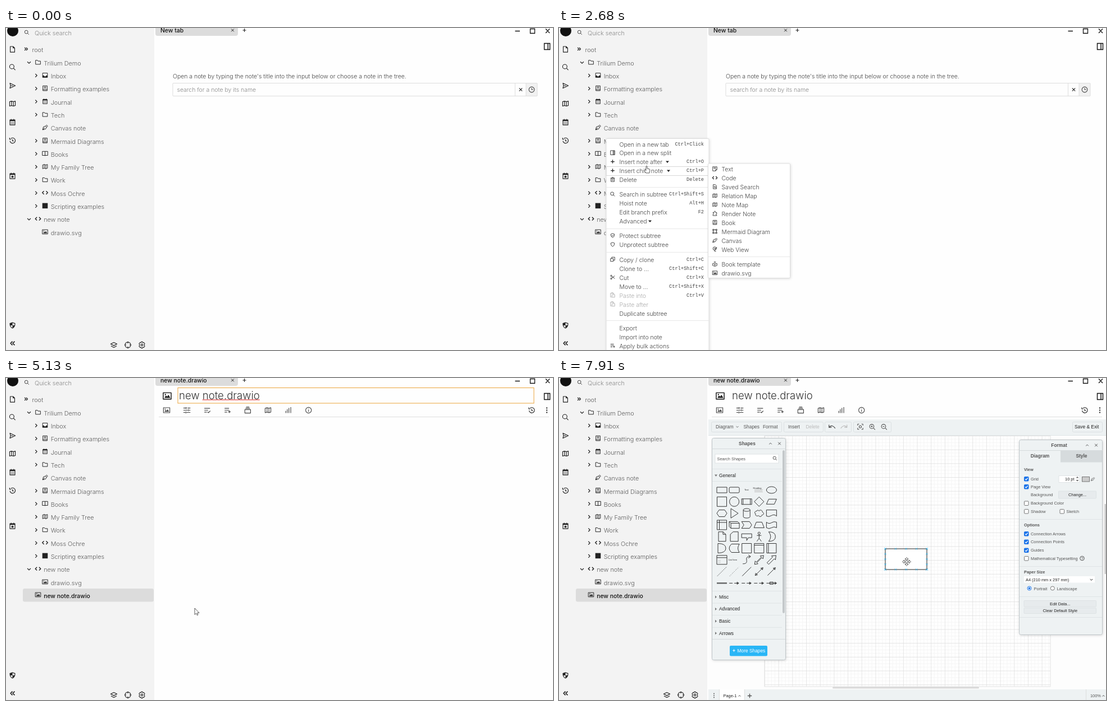
An HTML page for the animation above (8000 ms loop, 974 by 575 pixels).

```html
<!DOCTYPE html>
<html lang="en">
<head>
<meta charset="utf-8">
<title>Creating a diagram note</title>
<style>
html, body { margin: 0; width: 100%; height: 100%; overflow: hidden; background: #fff; }
svg { display: block; width: 974px; height: 575px; }
text { font: 300 10.45px Inter, "Open Sans", sans-serif; fill: #444; white-space: pre; }
.tree { font-size: 10.8px; fill: #5c5c5c; }
.soft { fill: #888; }
.off { fill: #aaa; }
.semi { font-size: 10.4px; font-weight: 500; fill: #111; }
.title { font-size: 18.6px; fill: #333; }
.key { font: 8.6px "Liberation Mono", monospace; fill: #444; }
.ui { font: 8.4px "Liberation Sans", Arial, sans-serif; fill: #555; }
.s { font-size: 7.4px; }
.xs { font-size: 4px; }
.b { font-weight: 700; }
.dark { fill: #222; }
.pale { fill: #bbb; }
.white { fill: #fff; }
.mid { text-anchor: middle; }
.end { text-anchor: end; }
.line { fill: none; stroke: currentColor; stroke-width: 2; stroke-linejoin: round; }
.heavy { stroke-width: 3; }
.solid { fill: currentColor; }
.tile { fill: none; stroke: #222; stroke-width: .9; }
.glyph { fill: #fff; stroke: #333; stroke-width: .8; stroke-linejoin: round; }
.pop { filter: drop-shadow(1px 1px 2px #0002); }
</style>
</head>
<body>
<svg id="stage" viewBox="0 0 974 575"></svg>
<script>
const stage = document.getElementById('stage');

// Icons on a 24 unit grid: outline, then filled part.
const icons = {
  file: ['M5 3h9l5 5v13H5zM14 3v5h5'],
  search: ['M3 10a7 7 0 1 0 14 0a7 7 0 1 0-14 0M15 15l6 6'],
  send: ['M4 4l17 8l-17 8l2-8zM6 12h8'],
  map: ['M3 6l6-2l6 2l6-2v14l-6 2l-6-2l-6 2zM9 4v14M15 6v14'],
  cal: ['M4 5h16v16H4zM8 2v4M16 2v4M7 13h2M11 13h2M15 13h2M7 17h2M11 17h2M15 17h2', 'M4 5h16v4H4z'],
  star: ['M4 5h16v16H4zM8 2v4M16 2v4', 'M4 5h16v4H4zM12 10l1.5 3l3.5.5l-2.5 2l.5 3.5l-3-2l-3 2l.5-3.5l-2.5-2l3.5-.5z'],
  history: ['M4 13a8.5 8.5 0 1 0 3-7.5M3 3v5h5M12 8v5h4'],
  clock: ['M3 12a9 9 0 1 0 18 0a9 9 0 1 0-18 0M12 7v5h5'],
  info: ['M3 12a9 9 0 1 0 18 0a9 9 0 1 0-18 0M12 11v6M12 7v2'],
  shield: ['M12 3l8 3q0 11-8 15q-8-4-8-15z'],
  guard: ['M12 3l8 3q0 11-8 15q-8-4-8-15z', 'M12 3v9h8q-2 6-8 9v-9H4V6z'],
  checked: ['M12 3l8 3q0 11-8 15q-8-4-8-15zM8 12l3 3l5-6'],
  left2: ['M12 6l-6 6l6 6M19 6l-6 6l6 6'],
  right2: ['M5 6l6 6l-6 6M12 6l6 6l-6 6'],
  right: ['M9 5l7 7l-7 7'],
  down: ['M5 9l7 7l7-7'],
  up: ['M5 16l7-7l7 7'],
  folder: ['M3 5h7l2 3h9v12H3z'],
  inbox: ['M3 4h18v16H3z', 'M3 13h5l1 3h6l1-3h5v7H3z'],
  book: ['M4 3h16v18H4zM4 17h16M8 7h8M8 11h8'],
  open: ['M2 4h20v15H2zM12 4v17'],
  pen: ['M3 21l3-11l8-3l4 4l-4 7zM14 7l4-4l4 4l-4 4M3 21l8-8'],
  code: ['M8 6l-6 6l6 6M16 6l6 6l-6 6'],
  image: ['M2 4h20v16H2z', 'M5 17l4-6l3 3l3-5l5 8zM6 7h3v3H6z'],
  square: ['', 'M2 2h20v20H2z'],
  layers: ['M2 9l10-5l10 5l-10 5zM3 15l9 5l9-5'],
  target: ['M3 12a9 9 0 1 0 18 0a9 9 0 1 0-18 0M12 1v6M12 17v6M1 12h6M17 12h6'],
  gear: ['M10 2h4l1 3l3-1l3 4l-2 4l2 4l-3 4l-3-1l-1 3h-4l-1-3l-3 1l-3-4l2-4l-2-4l3-4l3 1zM9 12a3 3 0 1 0 6 0a3 3 0 1 0-6 0'],
  plus: ['M12 4v16M4 12h16'],
  x: ['M5 5l14 14M19 5l-14 14'],
  split: ['M3 3h18v18H3zM14 3v18M18 3v18'],
  trash: ['M5 7h14v14H5zM3 6h18M9 3h6M10 11v6M14 11v6'],
  copy: ['M3 9h12v12H3zM8 9V3h13v13h-6'],
  cut: ['M3 6a3 3 0 1 0 6 0a3 3 0 1 0-6 0M3 18a3 3 0 1 0 6 0a3 3 0 1 0-6 0M8 8l13 10M8 16L21 6'],
  paste: ['M8 20H3V4h14v5M7 4V2h6v4M9 10h12v11H9z'],
  bulk: ['M3 6h14M3 12h14M3 18h8M18 13v8M14 17h8'],
  note: ['M3 3h18v12l-6 6H3zM21 15h-6v6', 'M7 7h10v3H7z'],
  find: ['M5 3h9l5 5v13H5zM9 13a3 3 0 1 0 6 0a3 3 0 1 0-6 0M14 15l3 3'],
  puzzle: ['M4 8h5V5a3 3 0 0 1 6 0v3h5v5a3 3 0 0 0 0 6v2H4v-5a3 3 0 0 0 0-6z'],
  nodes: ['M3 3h5v5H3zM16 3h5v5h-5zM3 16h5v5H3zM16 16h5v5h-5zM8 5h8M5 8v8M19 8v8M8 19h8'],
  web: ['M4 9a7 7 0 1 0 14 0a7 7 0 1 0-14 0M8 9h7M11 12q9 0 9-9M11 16v5h6'],
  reader: ['M3 10l9 3l9-3v9l-9 3l-9-3zM12 13v8M9 5a3 3 0 1 0 6 0a3 3 0 1 0-6 0'],
  sliders: ['M1 5h9M14 5h9M10 2v6M1 12h14M19 12h4M17 9v6M1 19h6M11 19h12M9 16v6'],
  tasks: ['M3 6h18M3 12h12M3 18h8M13 17l3 3l6-6'],
  stack: ['M3 10h18v11H3zM5 6h14M7 2h10'],
  bars: ['M4 14v7M9 9v12M14 5v16M20 2v19'],
  dots: ['', 'M10 2h4v4h-4zM10 10h4v4h-4zM10 18h4v4h-4z'],
  fit: ['M3 8V3h5M16 3h5v5M21 16v5h-5M8 21H3v-5M8 12a4 4 0 1 0 8 0a4 4 0 1 0-8 0'],
  zin: ['M3 10a7 7 0 1 0 14 0a7 7 0 1 0-14 0M15 15l6 6M7 10h6M10 7v6'],
  zout: ['M3 10a7 7 0 1 0 14 0a7 7 0 1 0-14 0M15 15l6 6M7 10h6'],
  undo: ['M3 6v8h8M4 13q9-9 18 4'],
  redo: ['M21 6v8h-8M20 13q-9-9-18 4'],
};
const heavy = ['right', 'down', 'up', 'left2', 'right2', 'x', 'plus', 'code'];

const text = (x, y, s, cls = '') => `<text x="${x}" y="${y + 3.7}" class="${cls}">${s}</text>`;
const ui = (x, y, s, cls = '') => `<text x="${x}" y="${y + 2.8}" class="ui ${cls}">${s}</text>`;
const rect = (x, y, w, h, fill, stroke = 'none', r = 0, attr = '') =>
  `<rect x="${x}" y="${y}" width="${w}" height="${h}" rx="${r}" fill="${fill}" stroke="${stroke}" ${attr}/>`;
const path = (d, color = '#ddd', w = 1, attr = '') => `<path d="${d}" fill="none" stroke="${color}" stroke-width="${w}" ${attr}/>`;
const fill = (d, color = '#222') => `<path d="${d}" fill="${color}"/>`;
const ring = (x, y, r, color, inside = 'none') => `<circle cx="${x}" cy="${y}" r="${r}" fill="${inside}" stroke="${color}"/>`;
const group = (id, body) => `<g id="${id}">${body}</g>`;
const icon = (name, x, y, size = 11, color = '#222') => {
  const [line, solid] = icons[name];
  const cls = heavy.includes(name) ? 'line heavy' : 'line';
  return `<g transform="translate(${x - size / 2} ${y - size / 2}) scale(${size / 24})" color="${color}">` +
    (line ? `<path class="${cls}" d="${line}"/>` : '') + (solid ? `<path class="solid" d="${solid}"/>` : '') + '</g>';
};

function sidebar() {
  const bar = [['file', 38], ['search', 70], ['send', 103], ['map', 135], ['cal', 168], ['history', 201],
    ['star', 264], ['guard', 531], ['left2', 563]];
  const tree = ['0folder|Trilium Demo', '1inbox|Inbox', '1book|Formatting examples', '1cal|Journal', '1folder|Tech',
    '2pen|Canvas note', '1book|Mermaid Diagrams', '1open|Books', '1map|My Family Tree', '1folder|Work',
    '1code|Moss Ochre', '1square|Scripting examples', '0code|new note', '2image|drawio.svg'];
  return rect(0, 0, 264, 575, '#f3f3f3') + '<circle cx="12" cy="5" r="10" fill="#111"/>' +
    bar.map(([n, y]) => icon(n, 11.5, y, 13.5)).join('') +
    icon('search', 37, 8, 10) + text(51, 9, 'Quick search', 'tree soft') +
    icon('right2', 36, 37.5, 10) + text(46.5, 39.5, 'root', 'tree') +
    tree.map((row, i) => {
      const [name, label] = row.slice(1).split('|'), level = +row[0], y = 63 + 23.31 * i;
      const x = level ? 69.5 : 57;
      return (level < 2 ? icon(level ? 'right' : 'down', x - 16, y - 1.5, 10) : '') +
        icon(name, x, y - 2, 11.5) + text(x + 10.2, y, label, 'tree');
    }).join('') +
    group('newRow', rect(30, 376, 233, 23.5, '#dcdcdc', 'none', 3) + icon('image', 57, 387, 11.5) + text(67.2, 388.8, '', 'semi name')) +
    icon('layers', 192, 566, 13.5) + icon('target', 217, 566, 13.5) + icon('gear', 242, 566, 13.5);
}

function frame() {
  return fill('M266 0H413V10Q413 14 409 14H270Q266 14 266 10Z', '#dcdcdc') +
    text(275, 4, '', 'semi name') + icon('x', 403.5, 4, 8) + icon('plus', 424.5, 4, 9) +
    path('M906.5 5.5H915M933.5 1.5H941.5V9.5H933.5ZM961 1.5L968 9M968 1.5L961 9', '#111', 1.3) +
    path('M958.5 27.5H968.5V38.5H958.5ZM965 27.5V38.5', '#111', 1.4);
}

function emptyTab() {
  return text(297, 86, "Open a note by typing the note's title into the input below or choose a note in the tree.") +
    rect(926, 98.5, 20, 23, '#f1f1f1') + rect(297, 98.5, 649, 23, 'none', '#ddd', 1) +
    path('M906.5 98.5V121.5M926 98.5V121.5') + text(304.5, 110, 'search for a note by its name', 'soft') +
    icon('x', 916.5, 110, 9) + icon('clock', 936, 110, 13, '#444');
}

function noteHead() {
  const ribbon = ['image', 'sliders', 'tasks', 'bulk', 'stack', 'map', 'bars', 'info'];
  return icon('image', 287, 32, 17, '#111') +
    '<text id="title" x="308" y="37.5" class="title name"></text>' +
    group('focus', rect(306, 17.5, 634, 27.5, 'none', '#eba43a') +
      path('M0 0', '#e02020', 1.2, 'id="spell"') + rect(0, 21, 1, 20, '#222', 'none', 0, 'id="caret"')) +
    ribbon.map((n, i) => icon(n, 286 + 36.1 * i, 57.5, 13.5, '#444')).join('') +
    icon('history', 936, 57.5, 13.5) + icon('dots', 963, 57.5, 12) + path('M272 69.5H967');
}

// Row centre, label, icon, shortcut, x of the submenu mark.
const menuRows = [
  [208, 'Open in a new tab', '', 'Ctrl+Click'], [223.7, 'Open in a new split', 'split'],
  [239.5, 'Insert note after', 'plus', 'Ctrl+O', 193], [255.5, 'Insert child note', 'plus', 'Ctrl+P', 195],
  [271.5, 'Delete', 'trash', 'Delete'], [297.7, 'Search in subtree', 'search', 'Ctrl+Shift+S'],
  [313.7, 'Hoist note', '', 'Alt+H'], [329.6, 'Edit branch prefix', '', 'F2'], [345.5, 'Advanced', '', '', 162],
  [371.7, 'Protect subtree', 'checked'], [387.7, 'Unprotect subtree', 'shield'], [414, 'Copy / clone', 'copy', 'Ctrl+C'],
  [430, 'Clone to ...', '', 'Ctrl+Shift+C'], [446, 'Cut', 'cut', 'Ctrl+X'], [462, 'Move to ...', '', 'Ctrl+Shift+X'],
  [478, 'Paste into', 'paste', 'Ctrl+V'], [494, 'Paste after', 'paste'], [510, 'Duplicate subtree'],
  [536.5, 'Export'], [552.3, 'Import into note'], [568, 'Apply bulk actions', 'bulk'],
];
const kinds = [['Text', 'note'], ['Code', 'code'], ['Saved Search', 'find'], ['Relation Map', 'map'], ['Note Map', 'map'],
  ['Render Note', 'puzzle'], ['Book', 'book'], ['Mermaid Diagram', 'nodes'], ['Canvas', 'pen'], ['Web View', 'web'],
  ['Book template', 'reader'], ['drawio.svg', 'image']];
const kindY = i => 10.5 + 15.95 * i + (i > 9 ? 10.3 : 0);

function contextMenu() {
  return rect(84, 197.5, 183, 400, '#fff', '#ddd', 2, 'class="pop"') +
    path('M84 284.5H267M84 358.5H267M84 400.5H267M84 522.5H267', '#e8e8e8') +
    rect(84, 0, 183, 16, 'none', '#d8d8d8', 0, 'id="menuHover"') +
    menuRows.map(([y, label, name, key, mark]) => {
      const off = label.startsWith('Paste');
      return (name ? icon(name, 95.5, y - 1, 10, off ? '#aaa' : '#222') : '') + text(107.5, y, label, off ? 'off' : '') +
        (key ? text(258, y - 2, key, 'key end' + (off ? ' off' : '')) : '') +
        (mark ? fill(`M${mark - 3} ${y - 2}h6l-3 3.5z`) : '');
    }).join('');
}

function subMenu() {
  return rect(265.5, 0, 146, 204.5, '#fff', '#ddd', 2, 'class="pop"') + path('M266 166.5H411', '#e8e8e8') +
    rect(265.5, 0, 146, 16, 'none', '#d0d0d0', 0, 'id="kindHover"') +
    kinds.map(([label, name], i) => icon(name, 277.5, kindY(i) - 1, 10) + text(289.5, kindY(i), label)).join('');
}

const tileRow = (row, ...shapes) => shapes.map((d, i) =>
  d && `<path class="tile" d="${d}" transform="translate(${290 + 22.1 * i} ${200 + 20.8 * row})"/>`).join('');
const box = 'M-8.5-8.5H8.5V8.5H-8.5Z', slab = 'M-9-5H9V5H-9Z', link = 'M-9 0H-3M0 0H8l-3-2v4l3-2';

function shapeTiles() {
  const tiny = [[334, 200, 'Text'], [353, 196.5, 'Heading'], [309.5, 324.5, 'List Item']];
  return tileRow(0, slab, 'M-7-5H7Q9-5 9-3V3Q9 5 7 5H-7Q-9 5-9 3V-3Q-9-5-7-5Z', '', '', 'M-9 0A9 6 0 1 1 9 0A9 6 0 1 1-9 0Z') +
    tileRow(1, box, 'M-8.5 0a8.5 8.5 0 1 1 17 0a8.5 8.5 0 1 1-17 0Z', slab + 'M-6.5-5V5M6.5-5V5',
      'M0-8.5L8.5 0L0 8.5L-8.5 0Z', 'M-5-4.5H9L5 4.5H-9Z') +
    tileRow(2, 'M-5-6H5L9 0L5 6H-5L-9 0Z', 'M-6-8.5L7 0L-6 8.5Z',
      'M-6-6V6A6 2.5 0 0 0 6 6V-6A6 2.5 0 0 0-6-6A6 2.5 0 0 0 6-6',
      'M-4-4C-8-4-9 0-6 1C-8 4-3 6-1 4C1 7 5 6 5 3C9 3 9-1 6-2C6-6 1-7 0-4C-1-6-4-6-4-4Z', 'M-9-6H9V5Q4.5 1 0 4T-9 5Z') +
    tileRow(3, box + 'M-8.5-4.5H8.5M-4.5-8.5V8.5', 'M-9-6H6L9-3V6H-6L-9 3ZM-9-6L-6-3H9M-6-3V6',
      'M-9-6H5L9 0L5 6H-9L-5 0Z', 'M-5-5H5L9 5H-9Z', 'M-9-5Q-4.5-1 0-4T9-5V5Q4.5 2 0 5T-9 5Z') +
    tileRow(4, 'M-6-8.5H2L7-4V8.5H-6ZM2-8.5V-4H7', 'M-2-8.5H7V8.5H-7V-4Z', 'M-9-5H9V2H3L0 7V2H-9Z',
      'M-2-6a2 2 0 1 1 4 0a2 2 0 1 1-4 0M0-4V3M-4-2H4M-4 8.5L0 3L4 8.5', 'M-5-8.5Q7-8.5 7 0T-5 8.5Q2 0-5-8.5Z') +
    tileRow(5, 'M-7-8.5Q7-8.5 7 0T-7 8.5Z', 'M-5-7.5H9Q4 0 9 7.5H-5Q-13 0-5-7.5Z', box,
      box + 'M-8.5-5.5H8.5', box + 'M-5.5-8.5V8.5') +
    tileRow(6, 'M-9-8H9V8H-9ZM-9-4H9', '', 'M-7 7C8 7-8-6 6-6M3-9L7-6L3-3',
      'M-8 8L-7 2L-5 4L4-5L2-7L8-8L7-2L5-4L-4 5L-2 7Z', 'M-8 5L2-5L0-7L8-8L7 0L5-2L-5 8Z') +
    `<g stroke-dasharray="1.5 1.5">${tileRow(7, 'M-8 8L8-8')}</g><g stroke-dasharray=".8 2">${tileRow(7, '', 'M-8 8L8-8')}</g>` +
    tileRow(7, '', '', 'M-8 8L8-8', 'M-6 6L6-6M7-7l-4 1l3 3ZM-7 7l4-1l-3-3Z', 'M-7 7L6-6M7-7l-4 1l3 3Z') +
    tileRow(8, 'M-9-.5H9M-9 .5H9', link, link, link, 'M-9 0H9l-3-2v4l3-2M-3-2H3V2H-3Z') +
    tiny.map(([x, y, s]) => ui(x, y - 1.8, s, 'xs mid dark')).join('') +
    path('M348 199.5H363M348 201.5H362M348 203.5H363M283 326H288M283 329H288', '#bbb', .8);
}

const panel = (x, y, w, h, name) => rect(x, y, w, h, '#eef2f3', '#bfc5c8', 3, 'class="pop"') +
  path(`M${x} ${y + 19}h${w}`, '#d5dadc') + ui(x + w / 2 - 3, y + 9.5, name, 'b mid') +
  icon('up', x + w - 27, y + 9.5, 8, '#555') + icon('x', x + w - 11, y + 9.5, 8, '#555');

function shapesPanel() {
  return panel(272.5, 107.5, 131, 396, 'Shapes') + rect(278, 136, 113, 16, '#fff', '#e0e4e6') +
    ui(281.5, 144, 'Search Shapes', 's') + icon('search', 384.5, 143.5, 9) + rect(398, 129, 4, 291, '#c4c8ca', 'none', 2) +
    path('M273 162.5H397M273 184.5H397', '#dfe4e6') + fill('M277 172.5h5l-2.5 3.5z', '#777') +
    ui(285, 174, 'General', 'dark') + shapeTiles() +
    ['Misc', 'Advanced', 'Basic', 'Arrows'].map((s, i) => {
      const y = 391 + 21.6 * i;
      return path(`M273 ${y - 10.5}H397`, '#dfe4e6') + fill(`M278 ${y - 2.5}v5l3-2.5z`, '#777') + ui(285, y, s, 'dark');
    }).join('') + path('M273 466.5H403', '#d5dadc') +
    rect(304, 478, 67, 18.5, '#29b6f6', 'none', 2) + ui(309, 487.3, '+', 'white b') + ui(317.5, 487.3, 'More Shapes', 'white');
}

const check = (x, y, on) => rect(x - 3.5, y - 3.5, 7.5, 7.5, on ? '#1a73e8' : '#fff', on ? '#1a73e8' : '#777', 1) +
  (on ? path(`M${x - 2} ${y + .3}l1.7 1.7l3-3.7`, '#fff', 1.2) : '');
const button = (x, y, w, h, s) => rect(x, y, w, h, '#e7ebed', '#dde2e4', 1) + ui(x + w / 2, y + h / 2, s, 's mid dark');

function formatPanel() {
  const checks = [['Grid', 180, 1], ['Page View', 194, 1], ['Background Color', 223.5, 0], ['Shadow', 238, 0],
    ['Connection Arrows', 278, 1], ['Connection Points', 292.5, 1], ['Guides', 307.5, 1], ['Mathematical Typesetting', 322, 0]];
  return panel(819.5, 110.5, 148, 348, 'Format') + rect(893, 130, 74, 20.5, '#d6dbdd') +
    ui(856.5, 139.5, 'Diagram', 'b mid') + ui(930.5, 139.5, 'Style', 'b mid') +
    [['View', 163.5], ['Options', 262.5], ['Paper Size', 346.5]].map(([s, y]) => ui(828, y, s, 's b')).join('') +
    checks.map(([s, y, on]) => check(832, y, on) + ui(840, y, s, 's')).join('') +
    check(895.5, 238, 0) + ui(903.5, 238, 'Sketch', 's') +
    path('M820 252.5H967M820 336.5H967M820 390.5H967M820 427.5H967', '#dfe4e6') +
    rect(890, 174.5, 37, 12, '#fff', '#e0e4e6') + ui(917.5, 180.5, '10 pt', 's end dark') +
    fill('M920.5 178.5h5l-2.5-2.5zM920.5 182h5l-2.5 2.5z', '#666') +
    rect(931.5, 176.5, 13, 8.5, '#ccc', '#777') + icon('pen', 950.5, 180.5, 8, '#555') +
    ui(840, 208.5, 'Background', 's') + button(889.5, 202, 67, 13, 'Change...') +
    ring(931.5, 322, 3.8, '#555') + ui(931.5, 322, '?', 's mid') +
    rect(828, 354, 126, 11.5, '#fff') + ui(831, 359.8, 'A4 (210 mm x 297 mm)', 's dark') + icon('down', 948, 360, 8) +
    ring(837.5, 375.5, 3.5, '#1a73e8', '#fff') + ring(837.5, 375.5, 1.5, '#1a73e8', '#1a73e8') +
    ring(878.8, 375.5, 3.5, '#777', '#fff') +
    ui(845.5, 376.5, 'Portrait', 's') + ui(886.5, 376.5, 'Landscape', 's') +
    button(828, 397.5, 128.5, 11, 'Edit Data...') + button(828, 410.5, 128.5, 10, 'Clear Default Style');
}

function editor() {
  const unit = 6.17, cell = unit * 4;
  const crosses = [0, 1, 2, 3, 4].flatMap(i => {
    const x = 581 + 18.5 * i, y = 305 + 9.25 * i;
    return [[x, 305], [x, 342], [581, y], [655, y]];
  }).map(([x, y]) => `M${x - 1.5} ${y - 1.5}l3 3m0-3l-3 3`).join('');
  const slots = [[271, 125], [400, 70], [473, 47], [524, 67], [914, 53]];
  return `<defs><pattern id="grid" x="366" y="103" width="${cell}" height="${cell}" patternUnits="userSpaceOnUse">` +
    [1, 2, 3].map(i => path(`M${unit * i} 0V${cell}M0 ${unit * i}H${cell}`, '#f4f4f4', .9)).join('') +
    path(`M0 0V${cell}M0 0H${cell}`, '#dcdcdc', 1.4) + '</pattern></defs>' +
    rect(266, 74, 708, 501, '#fdfdfd') + rect(366, 103, 509, 448, '#fff') + rect(366, 103, 509, 448, 'url(#grid)', '#e2e2e2') +
    group('shape', rect(581, 305, 74, 37, '#fff', '#222') + group('crosses', path(crosses, '#29a9e0', .9))) +
    rect(266, 74, 708, 28, '#eef2f3') + path('M266 102.5H974', '#dfe4e6') +
    slots.map(([x, w]) => rect(x + .5, 78.5, w, 18, '#eef2f3', '#dbe0e2', 2)).join('') +
    ui(279, 87.5, 'Diagram') + icon('down', 317.5, 87, 7, '#555') + ui(328.5, 87.5, 'Shapes') + ui(363, 87.5, 'Format') +
    ui(408, 87.5, 'Insert') + ui(439.5, 87.5, 'Delete', 'pale') +
    group('undoOff', icon('undo', 486, 87, 14, '#bbb')) + group('undoOn', icon('undo', 486, 87, 14, '#444')) +
    icon('redo', 507.5, 87, 14, '#bbb') +
    icon('fit', 536.5, 87, 12.5, '#555') + icon('zin', 558, 87.5, 13, '#555') + icon('zout', 579, 87.5, 13, '#555') +
    ui(918, 87, 'Save &amp; Exit', 'dark') + rect(487, 551.5, 261, 3, '#d8d8d8', 'none', 1.5) + rect(971.5, 225, 3, 125, '#ccc') +
    rect(266, 556, 708, 19, '#eef2f3') + rect(286, 556, 44.5, 19, '#fff') + path('M285.5 556V575M330.5 556V575M938.5 556V575') +
    icon('dots', 276, 567, 10, '#555') + ui(292.5, 567.5, 'Page-1', 's dark') + icon('up', 321.5, 567.5, 6.5) +
    icon('plus', 339.5, 567.5, 11, '#555') + ui(946, 567.5, '100%', 's') + icon('up', 969.5, 567.5, 6.5) +
    shapesPanel() + formatPanel();
}

const pointers = {
  arrow: 'M0 0V11.5L2.7 9.2L4.3 12.7L6 12L4.5 8.4H8Z',
  hand: 'M-1 1Q0-1 1 1V5L5 6Q6 6.5 5.7 9L5 13H-1L-4.5 8.5Q-4 6.5-1 8.5Z',
  move: 'M0-7.5L3-4.5H1V-1H4.5V-3L7.5 0L4.5 3V1H1V4.5H3L0 7.5L-3 4.5H-1V1H-4.5V3L-7.5 0L-4.5-3V-1H-1V-4.5H-3Z',
};

stage.innerHTML = rect(0, 0, 974, 575, '#fefefe') + sidebar() + frame() +
  group('empty', emptyTab()) + group('note', noteHead()) + group('editor', editor()) +
  group('menu', contextMenu()) + group('sub', subMenu()) + '<path id="pointer" class="glyph"/>';

const $ = id => document.getElementById(id);
const names = [...document.querySelectorAll('.name')];
const show = (id, on) => { $(id).style.display = on ? '' : 'none'; };

// Pointer path: time, x, y.
const track = [
  [360, 868, 565], [900, 3, 67], [1070, 3, 67], [1230, 82, 66], [1400, 98, 190], [1620, 84, 338], [2310, 84, 338],
  [2500, 130, 290], [2680, 156, 246], [2750, 157, 240], [2920, 157, 240], [3290, 300, 243], [3520, 300, 243],
  [3700, 322, 344], [4230, 336, 418], [4560, 336, 418], [4650, 336, 411], [5140, 336, 411], [5340, 450, 297],
  [5640, 450, 297], [5770, 472, 288], [6030, 472, 288], [6500, 300, 202], [6820, 290, 200], [6900, 290, 200],
  [7630, 527, 271], [7660, 527, 271], [7900, 619, 328],
];
function pose(t) {
  const i = track.findIndex(p => p[0] > t);
  if (i < 0) return track.at(-1).slice(1);
  if (!i) return track[0].slice(1);
  const [a, ax, ay] = track[i - 1], [b, bx, by] = track[i], k = (t - a) / (b - a);
  return [ax + (bx - ax) * k, ay + (by - ay) * k];
}

function drawMenus(t) {
  const open = t >= 1850 && t < 4560;
  show('menu', open);
  // Hover styling trails the pointer slightly.
  const [x, y] = pose(t - 50), inSub = x > 265;
  const row = inSub ? menuRows[2] : menuRows.find(r => Math.abs(r[0] - y) <= 8);
  show('menuHover', row);
  if (row) $('menuHover').setAttribute('y', row[0] - 8);
  const top = row === menuRows[2] ? 226 : row === menuRows[3] ? 242 : 0;
  show('sub', open && top);
  $('sub').setAttribute('transform', `translate(0 ${top})`);
  const kind = inSub ? kinds.findIndex((_, i) => Math.abs(226 + kindY(i) - y) <= 8) : -1;
  show('kindHover', kind >= 0);
  if (kind >= 0) $('kindHover').setAttribute('y', kindY(kind) - 8);
}

function drawNote(t) {
  const on = t >= 4560, focused = on && t < 5640;
  const typed = Math.max(0, Math.min(7, Math.floor((t - 4680) / 55)));
  const label = on ? 'new note' + '.drawio'.slice(0, typed) : 'New tab';
  for (const el of names) if (el.textContent !== label) el.textContent = label;
  show('empty', !on);
  show('note', on);
  show('newRow', on);
  show('focus', focused);
  if (focused) {
    const title = $('title'), end = 308 + title.getComputedTextLength();
    $('spell').setAttribute('d', typed > 6 ? `M${308 + title.getSubStringLength(0, 4)} 39H${end}` : 'M0 0');
    $('caret').setAttribute('x', end);
    show('caret', (t - 4560) % 820 < 520);
  }
}

function drawEditor(t) {
  const inserted = t >= 6900;
  show('editor', t >= 5690);
  show('shape', inserted);
  show('undoOn', inserted);
  show('undoOff', !inserted);
  show('crosses', t >= 7810);
}

function drawPointer(t) {
  const [x, y] = pose(t);
  const hand = (t >= 1850 && t < 4560) || (t >= 6480 && t < 6960);
  show('pointer', t >= 360);
  $('pointer').setAttribute('d', pointers[t >= 7810 ? 'move' : hand ? 'hand' : 'arrow']);
  $('pointer').setAttribute('transform', `translate(${x} ${y})`);
}

const start = performance.now();
function draw() {
  const t = (performance.now() - start) % 8000;
  drawNote(t);
  drawMenus(t);
  drawEditor(t);
  drawPointer(t);
  requestAnimationFrame(draw);
}
draw();
</script>
</body>
</html>
```
